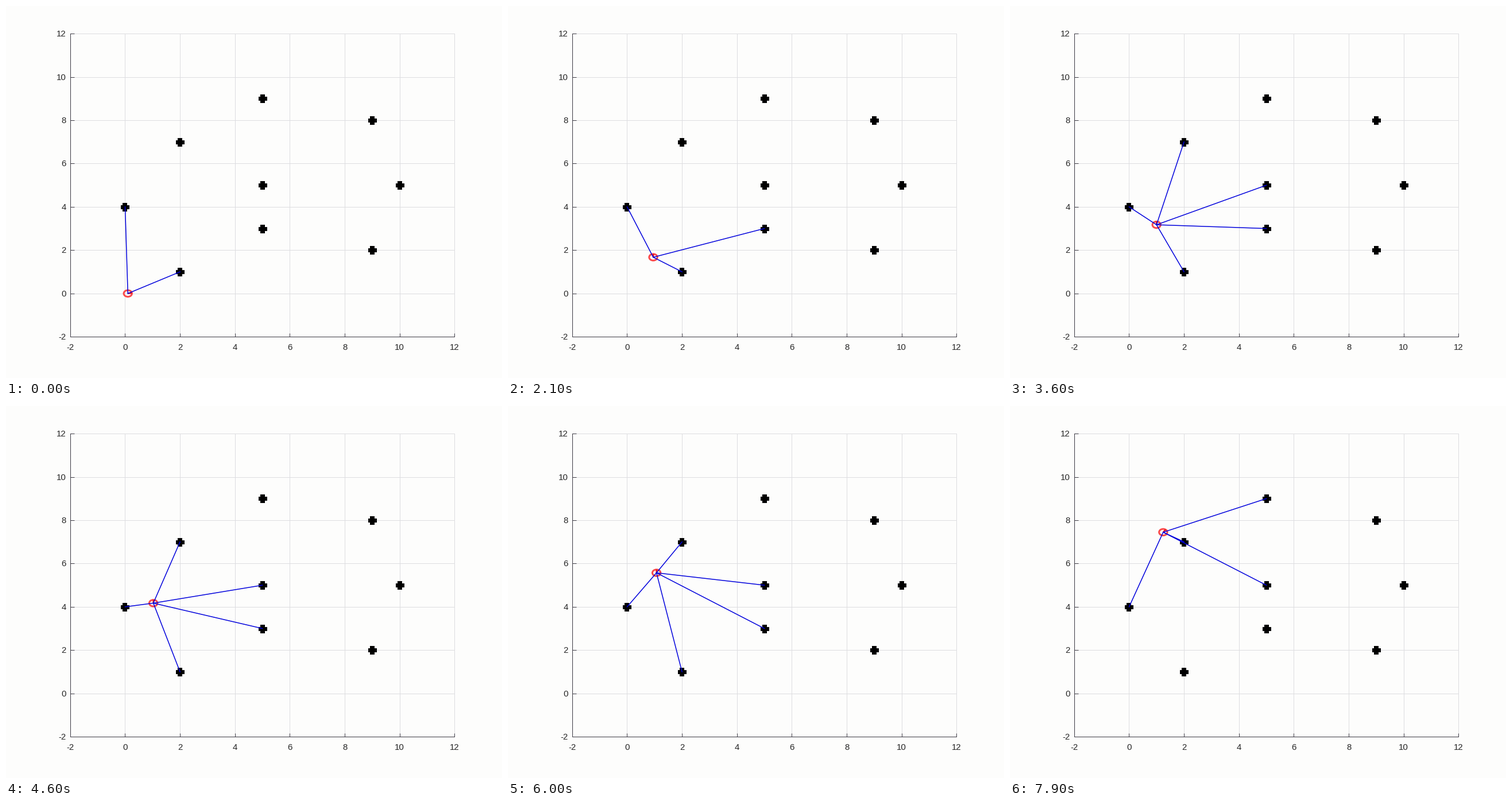
Recreate the animation shown at these times as a matplotlib script. Size 864 by 648 pixels, loop 8 s.

```python
import numpy as np
import matplotlib.pyplot as plt
from matplotlib.animation import FuncAnimation
from matplotlib.patches import Circle
from matplotlib.path import Path

W, H = 864, 648
FRAMES, INTERVAL = 80, 100
STEP = 0.1             # distance travelled per frame
MAX_TURN = 6.8         # degrees per frame
GAIN = 0.3
SENSOR_RANGE = 5
RADIUS = 0.15
LANDMARKS = np.array([(0, 4), (2, 1), (2, 7), (5, 3), (5, 5),
                      (5, 9), (9, 2), (9, 8), (10, 5)], float)


def drive():
    """Positions and headings of a robot with a limited turn rate."""
    pos, heading = np.array([0.1, 0.0]), 0.7
    path, headings = [], []
    for i in range(FRAMES):
        path.append(pos)
        goal = 88.3 if i < 75 else 20
        heading += np.clip(GAIN * (goal - heading), -MAX_TURN, MAX_TURN)
        a = np.radians(heading)
        headings.append(a)
        pos = pos + STEP * np.array([np.cos(a), np.sin(a)])
    return path, headings


def plus(r, w, h):
    """Closed cross of half size r with half arm widths w and h."""
    return Path([(-w, -r), (w, -r), (w, -h), (r, -h), (r, h), (w, h),
                 (w, r), (-w, r), (-w, h), (-r, h), (-r, -h), (-w, -h),
                 (-w, -r)], closed=True)


path, headings = drive()

# At 72 dpi one point is one pixel.
fig = plt.figure(figsize=(W / 72, H / 72), dpi=72, facecolor="#fdfdfc")
# The half pixel makes lines snap down to whole pixels.
ax = fig.add_axes([0.13 - 0.5 / W, 0.11 + 0.5 / H, 0.775, 0.815],
                  facecolor="none")
ax.set(xlim=(-2, 12), ylim=(-2, 12))
ticks = range(-2, 13, 2)
ax.set_xticks(ticks)
ax.set_yticks(ticks)
ax.set_axisbelow(True)
ax.grid(color="#dddde0", lw=1, clip_on=False)
ax.tick_params(direction="in", length=6.5, width=1, color="#3c3a44",
               labelbottom=False, labelleft=False)
for side in ("top", "right"):
    ax.spines[side].set_visible(False)
for side in ("left", "bottom"):
    ax.spines[side].set(color="#3c3a44", linewidth=1)

font = dict(family="Liberation Sans", size=15, color="#262626",
            textcoords="offset points", va="baseline",
            annotation_clip=False)
for v in ticks:
    ax.annotate(str(v), (v, -2), xytext=(0, -23), ha="center", **font)
    ax.annotate(str(v), (-2, v), xytext=(-7, -5), ha="right", **font)

ax.scatter(*LANDMARKS.T, s=15 ** 2, marker=plus(7.5, 4, 3.5),
           color="black", linewidths=0, zorder=3)
ring = ax.add_patch(Circle(path[0], RADIUS, fill=False, ec="#fb4a4a",
                           lw=3, zorder=4))
nose, = ax.plot([], [], color="#e8101c", lw=2.5, zorder=4,
                solid_capstyle="butt")
beams = [ax.plot([], [], color="#0000dc", lw=1.5, zorder=5)[0]
         for _ in LANDMARKS]


def update(i):
    pos, a = path[i], headings[i]
    ring.center = pos
    tip = pos + RADIUS * np.array([np.cos(a), np.sin(a)])
    nose.set_data(*zip(pos, tip))
    for beam, mark in zip(beams, LANDMARKS):
        beam.set_data(*zip(pos, mark))
        beam.set_visible(np.hypot(*(mark - pos)) < SENSOR_RANGE)
    return [ring, nose, *beams]


anim = FuncAnimation(fig, update, frames=FRAMES, interval=INTERVAL,
                     repeat=True, repeat_delay=0)
plt.show()
```
